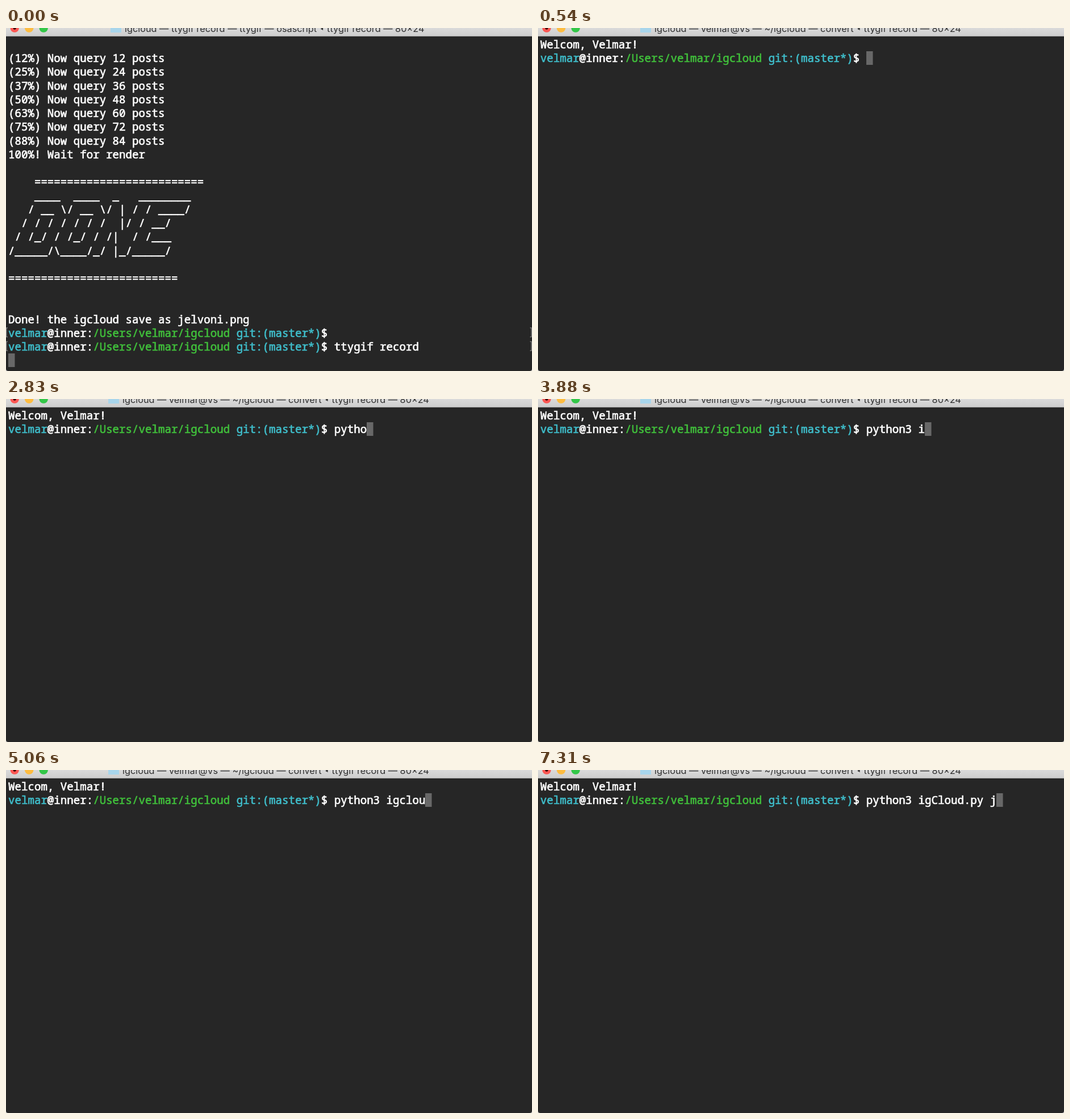
These frames come from a looping animation (926x605 px, 8000 ms). An HTML page with a canvas:

```html
<!DOCTYPE html>
<html lang="en">
<head>
<meta charset="utf-8">
<title>Terminal recording</title>
<style>
html, body { margin: 0; width: 100%; height: 100%; overflow: hidden; background: #262626; }
canvas { display: block; }
</style>
</head>
<body>
<canvas id="stage" width="926" height="605"></canvas>
<script>
const W = 926, H = 605, LOOP = 8000;
const LEFT = 4, TOP = 16.8, COL = 11.475, ROW = 24.24, BASE = 19.2;
const WHITE = '#ffffff', CYAN = '#3fbdca', GREEN = '#40be3b';
const ctx = document.getElementById('stage').getContext('2d');

const CLEAR_AT = 290, TITLE_AT = 410, PROMPT_AT = 540;
const USER = 'velmar';
const PROMPT = [
  [USER, CYAN], ['@inner:', WHITE], [`/Users/${USER}/igcloud`, GREEN],
  [' git:(master*)', CYAN], ['$ ', WHITE]
];
const REPORT = [
  '',
  ...[12, 25, 37, 50, 63, 75, 88].map((p, i) => `(${p}%) Now query ${12 * (i + 1)} posts`),
  '100%! Wait for render',
  '',
  '    ' + '='.repeat(26),
  '    ____  ____  _   ________',
  '   / __ \\/ __ \\/ | / / ____/',
  '  / / / / / / /  |/ / __/',
  ' / /_/ / /_/ / /|  / /___',
  '/_____/\\____/_/ |_/_____/',
  '',
  '='.repeat(26),
  '',
  '',
  'Done! the igcloud save as jelvoni.png'
];

// Each entry: time and the command line from then on.
const word = 'python3 igclou';
const keyTimes = [2150, 2340, 2400, 2640, 2830, 3370, 3530, 3750, 3880, 4330, 4410, 4590, 4820, 5060];
const TYPING = keyTimes.map((t, i) => [t, word.slice(0, i + 1)]);
TYPING.push([7170, 'python3 igCloud.py '], [7310, 'python3 igCloud.py j']);

function dot(x, y, r, color) {
  ctx.fillStyle = color;
  ctx.beginPath();
  ctx.arc(x, y, r, 0, Math.PI * 2);
  ctx.fill();
}

// Filled and thinly outlined, for a medium weight.
function cells(row, col, text, color = WHITE) {
  ctx.font = '500 19.1px "Noto Sans Mono", monospace';
  ctx.fillStyle = ctx.strokeStyle = color;
  ctx.lineWidth = 0.7;
  ctx.lineJoin = 'round';
  const y = TOP + row * ROW + BASE;
  for (const ch of text) {
    const x = LEFT + col * COL;
    if (ch !== ' ') {
      ctx.fillText(ch, x, y);
      ctx.strokeText(ch, x, y);
    }
    col++;
  }
  return col;
}

function promptLine(row, command) {
  let col = 0;
  for (const [text, color] of PROMPT) col = cells(row, col, text, color);
  return cells(row, col, command);
}

function cursor(row, col) {
  ctx.fillStyle = '#686868';
  const y = Math.round(TOP + row * ROW);
  ctx.fillRect(Math.round(LEFT + col * COL), y, 11.5, 24);
}

// Grey brackets at the window edges beside a prompt.
function marks(row) {
  const y = TOP + row * ROW + 3;
  ctx.strokeStyle = '#8a8a8a';
  ctx.lineWidth = 1.3;
  for (const [edge, tip] of [[0.7, 3], [W - 1, W - 3.5]]) {
    ctx.beginPath();
    ctx.moveTo(tip, y);
    ctx.lineTo(edge, y);
    ctx.lineTo(edge, y + 16);
    ctx.lineTo(tip, y + 16);
    ctx.stroke();
  }
}

function titleText(text, x) {
  ctx.font = '16.3px Inter, sans-serif';
  ctx.fillStyle = '#303030';
  ctx.fillText(text, x, 6.8);
  return x + ctx.measureText(text).width;
}

function titleBar(text, x) {
  const shade = ctx.createLinearGradient(0, 0, 0, 14);
  shade.addColorStop(0, '#dadada');
  shade.addColorStop(1, '#cecece');
  ctx.fillStyle = shade;
  ctx.fillRect(0, 0, W, 14);
  ctx.fillStyle = '#979797';
  ctx.fillRect(0, 14, W, 1);
  dot(15.2, 0, 7.7, '#fc5753');
  dot(15.2, 0, 2.7, '#3a0503');
  dot(40.7, 0, 7.7, '#fdbc40');
  dot(66.2, 0, 7.7, '#33c748');
  ctx.fillStyle = '#a8d5eb';
  ctx.fillRect(x - 25, 0, 19, 8);

  const end = titleText(text, x);
  ctx.beginPath();
  ctx.moveTo(end + 6.5, 1.5);
  ctx.lineTo(end + 11, -1);
  ctx.lineTo(end + 11, 4);
  ctx.fill();
  titleText('ttygif record — 80×24', end + 18);
}

function corners() {
  ctx.fillStyle = '#c4c4c4';
  for (const [x, d] of [[0, 1], [W, -1]]) {
    ctx.beginPath();
    ctx.moveTo(x, H - 4);
    ctx.quadraticCurveTo(x, H, x + d * 4, H);
    ctx.lineTo(x, H);
    ctx.fill();
  }
}

function draw(t) {
  ctx.fillStyle = '#262626';
  ctx.fillRect(0, 0, W, H);
  if (t < CLEAR_AT) {
    titleBar('igcloud — ttygif record — ttygif — osascript', 209);
    REPORT.forEach((line, row) => cells(row, 0, line));
    promptLine(21, '');
    promptLine(22, 'ttygif record');
    marks(21);
    marks(22);
    cursor(23, 0);
  } else {
    if (t < TITLE_AT) titleBar('igcloud — ttygif record — ttygif — convert', 216);
    else titleBar(`igcloud — ${USER}@Vs — ~/igcloud — convert`, 205);
    cells(0, 0, 'Welcom, Velmar!');
    let col = 0;
    if (t >= PROMPT_AT) {
      const typed = TYPING.filter(([at]) => t >= at).pop();
      col = promptLine(1, typed ? typed[1] : '');
    }
    cursor(1, col);
  }
  corners();
}

const start = performance.now();
function tick() {
  draw((performance.now() - start) % LOOP);
  requestAnimationFrame(tick);
}
tick();
</script>
</body>
</html>
```
